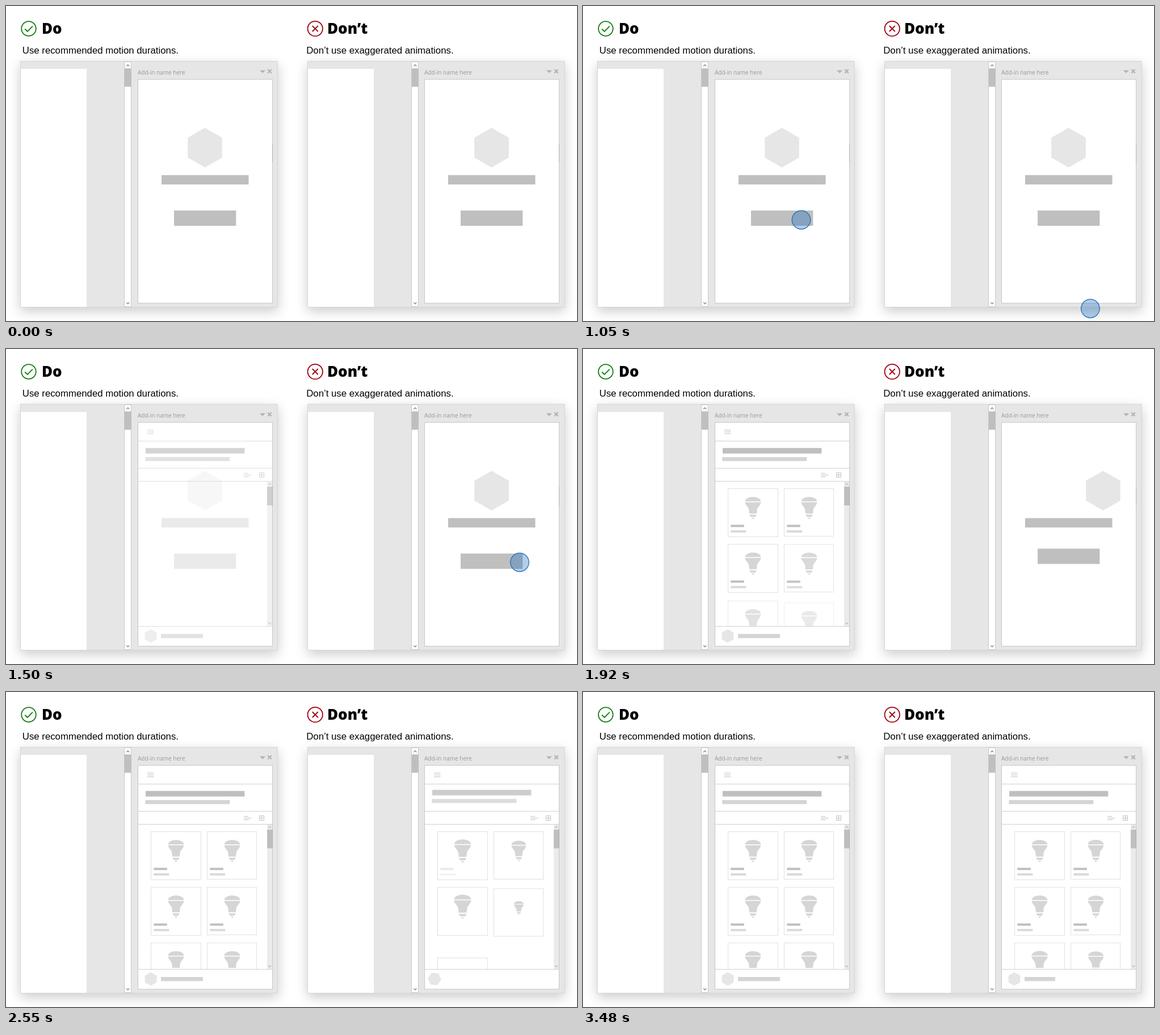
These frames come from a looping animation (1006x556 px, 4.47 s). An HTML page with a canvas:

```html
<!DOCTYPE html>
<html lang="en">
<head>
<meta charset="utf-8">
<title>Motion durations</title>
<style>
  html, body { margin: 0; width: 100%; height: 100%; overflow: hidden; background: #fff; }
  canvas { display: block; }
</style>
</head>
<body>
<canvas id="stage" width="1006" height="556"></canvas>
<script>
const ctx = document.getElementById('stage').getContext('2d');
const LOOP = 4470, STEP = 30;
const MID = '#bfbfbf', SOFT = '#d4d4d4', PALE = '#e6e6e6', LINE = '#d0d0d0';

// Progress of t through [a, b], held at 0 and 1 outside
const prog = (t, a, b) => Math.max(0, Math.min(1, (t - a) / (b - a)));
const inOut = p => p < .5 ? 2 * p * p : 1 - 2 * (1 - p) ** 2;

function rect(x, y, w, h, color) {
  ctx.fillStyle = color;
  ctx.fillRect(x, y, w, h);
}
function frame(x, y, w, h, color) {
  ctx.strokeStyle = color;
  ctx.lineWidth = 1;
  ctx.strokeRect(x, y, w, h);
}
function stroke(d, color, width) {
  ctx.strokeStyle = color;
  ctx.lineWidth = width;
  ctx.stroke(new Path2D(d));
}
function circle(x, y, r, color, width, fill) {
  ctx.beginPath();
  ctx.arc(x, y, r, 0, Math.PI * 2);
  if (fill) { ctx.fillStyle = fill; ctx.fill(); }
  ctx.strokeStyle = color;
  ctx.lineWidth = width;
  ctx.stroke();
}
function hexagon(x, y, r, turn = 0) {
  ctx.beginPath();
  for (let i = 0; i < 6; i++) {
    const a = turn + i * Math.PI / 3;
    ctx.lineTo(x + r * Math.sin(a), y - r * Math.cos(a));
  }
  ctx.fillStyle = PALE;
  ctx.fill();
}
function text(s, x, y, font, color) {
  ctx.font = font;
  ctx.fillStyle = color;
  ctx.fillText(s, x, y);
}
// Runs draw with its own transform, clip and opacity
function layer(dx, dy, alpha, draw) {
  if (alpha <= 0) return;
  ctx.save();
  ctx.translate(dx, dy);
  ctx.globalAlpha *= alpha;
  draw();
  ctx.restore();
}
function clip(x, y, w, h) {
  ctx.beginPath();
  ctx.rect(x, y, w, h);
  ctx.clip();
}
const chevron = (x, y, up, color) =>
  stroke(`M${x - 2.5},${y + up * 1.3}L${x},${y - up * 1.3}L${x + 2.5},${y + up * 1.3}`, color, 1.2);

const bulbShape = new Path2D(
  'M-14,-11.5C-13,-22 13,-22 14,-11.5Z' +
  'M-14,-10C-13,-3 -7,-2 -7,5L-6.5,10H6.5L7,5C7,-2 13,-3 14,-10Z' +
  'M-6,12H6Q5,16 3,16H-3Q-5,16 -6,12Z' +
  'M-2.5,17.5H2.5L1,19.5H-1Z');

function chrome() {
  ctx.save();
  ctx.shadowColor = 'rgba(0,0,0,.2)';
  ctx.shadowBlur = 20;
  ctx.shadowOffsetY = 7;
  rect(25, 97, 453.5, 435, PALE);
  ctx.restore();
  frame(25.5, 97.5, 452.5, 434, '#d6d6d6');
  rect(26, 111, 116, 420, '#fff');
  rect(209, 99, 12, 432, '#fff');
  frame(208.5, 98.5, 12, 432, '#c8c8c8');
  rect(209, 110, 12, 32.5, MID);
  stroke('M209,110.5H221', '#c8c8c8', 1);
  chevron(214.8, 105, 1, '#777');
  chevron(214.8, 524.5, -1, '#777');
}

function paneHead() {
  text('Add-in name here', 232, 121, '10px "Open Sans", "Noto Sans", sans-serif', '#999');
  ctx.fillStyle = '#b2b2b2';
  ctx.fill(new Path2D('M447,113.5H457L452,118.5Z'));
  stroke('M461.3,112L467.7,118.5M467.7,112L461.3,118.5', '#b2b2b2', 2.2);
  rect(232, 129, 238, 395, '#fff');
}

function splash(hexX, buttonY) {
  hexagon(350.5 + hexX, 250, 35);
  rect(274, 298.5, 153.5, 16.5, MID);
  rect(296, 361 + buttonY, 109.3, 27, MID);
}

function card(i, s) {
  const x = i % 2 ? 354.5 : 255.5, y = 246.5 + 98.2 * (i >> 1);
  layer(x, y + s.dy, s.alpha, () => {
    frame(0, 0, i % 2 ? 87 : 88, i % 2 ? 84 : 85, '#e0e0e0');
    layer(44, 34, s.bulb > 0 ? 1 : 0, () => {
      ctx.scale(s.bulb, s.bulb);
      ctx.fillStyle = '#d5d5d5';
      ctx.fill(bulbShape);
    });
    layer(4.8, 0, s.label, () => {
      rect(0, 63.8, 23.5, 4, MID);
      rect(0, 73.5, 27, 4, '#dadada');
    });
  });
}

// s: title {alpha, dy}, cards(i), footX, footW
function screen(s) {
  ctx.save();
  clip(232, 129, 238, 395);
  stroke('M249,143H260.5M249,146.3H260.5M249,149.6H260.5', MID, 1);
  layer(0, s.title.dy, s.title.alpha, () => {
    rect(246, 174.7, 174.3, 9.8, MID);
    rect(245.3, 190.8, 149, 7, SOFT);
  });
  stroke('M419,219.5H427M419,222.5H432.5M419,225.5H428', MID, 1.1);
  frame(446.5, 218.5, 8, 8, '#c4c4c4');
  stroke('M450.5,218V227M446,222.5H455', '#c4c4c4', 1);

  ctx.save();
  clip(233, 234, 227, 255);
  for (let i = 0; i < 6; i++) card(i, s.cards(i));
  ctx.restore();

  rect(460, 234, 9.5, 255, '#ebebeb');
  rect(460, 243, 9.5, 33, MID);
  chevron(464.7, 238.5, 1, '#b8b8b8');
  chevron(464.7, 484, -1, '#b8b8b8');
  stroke('M233,162.5H469M233,210.5H469M233,233.5H469M233,489.5H469', LINE, 1);
  hexagon(255 + s.footX, 506.5, 12, s.footX / 12);
  rect(273, 503, s.footW, 7.3, SOFT);
  ctx.restore();
}

function paneEdge() {
  frame(232.5, 129.5, 237, 395, '#c8c8c8');
  rect(469, 243, 1, 33, '#b0b0b0');
}

function cursor(x0, x1, y1, p, alpha) {
  const e = inOut(p);
  layer(x0 + (x1 - x0) * e, 574 + (y1 - 574) * e, alpha,
    () => circle(0, 0, 16.3, '#1a69b8', 1.2, 'rgba(0,95,184,.3)'));
}

// Calm: one cross-fade, then cards follow quickly
function calmPane(t) {
  const fade = prog(t, 1300, 1600);
  layer(0, 0, 1 - fade, () => splash(0, 0));
  layer(0, 0, fade, () => screen({
    title: { alpha: 1, dy: 0 },
    cards: i => {
      const p = prog(t, 1620 + 40 * i, 1820 + 40 * i);
      return { alpha: p, dy: 20 * (1 - p) ** 2, bulb: 1, label: 1 };
    },
    footX: 0, footW: 74
  }));
}

// Grows past full size, then rings out
function bounce(t) {
  if (t < 0) return Math.max(0, 1.15 * (1 + t / 225));
  return 1 + .15 * Math.exp(-t / 330) * Math.cos(t * Math.PI / 180);
}

// Busy: everything swings, rolls and bounces
function busyPane(t) {
  const swing = t < 1742 ? 0 : Math.sin((t - 1742) / 350 * Math.PI / 2);
  const title = prog(t, 2340, 2610);
  layer(0, 0, 1 - prog(t, 2175, 2325), () => {
    clip(232, 129, 238, 395);
    splash(85 * swing, -12 * swing);
  });
  layer(0, 0, prog(t, 2155, 2395), () => screen({
    title: { alpha: title, dy: -9 * (1 - title) },
    cards: i => ({
      alpha: 1,
      dy: 13 * Math.max(0, (2190 + 140 * i - t) / 140) ** 2,
      bulb: bounce(t - 2190 - 155 * i),
      label: prog(t, 2520 + 160 * i, 2610 + 160 * i)
    }),
    footX: -30 * (1 - prog(t, 2300, 2600)),
    footW: 54 * (1 - (1 - prog(t, 2600, 3480)) ** 1.4)
  }));
}

function draw(t) {
  rect(0, 0, 1006, 556, '#fff');

  const head = '800 26px "Open Sans", "Noto Sans", sans-serif';
  const body = '16.8px "Liberation Sans", Arial, sans-serif';
  circle(40, 40, 12.8, '#107c10', 1.8);
  stroke('M33.3,40.5L37.8,45L47,35.7', '#107c10', 1.8);
  text('Do', 63, 49.3, head, '#000');
  text('Use recommended motion durations.', 28.8, 83.5, body, '#000');
  circle(544.7, 40, 13.2, '#a00010', 1.8);
  stroke('M539.7,35L549.7,45M549.7,35L539.7,45', '#a00010', 1.8);
  text('Don’t', 566, 49.3, head, '#000');
  text('Don’t use exaggerated animations.', 529.2, 83.5, body, '#000');

  layer(0, 0, 1, chrome);
  layer(506, 0, 1, chrome);
  [[0, calmPane], [505, busyPane]].forEach(([dx, pane]) => layer(dx, 0, 1, () => {
    paneHead();
    pane(t);
    paneEdge();
  }));

  cursor(372, 384.5, 377.5, prog(t, 600, 1050), 1 - prog(t, 1140, 1260));
  cursor(891, 905, 376.5, prog(t, 840, 1500), 1 - prog(t, 1600, 1740));
}

const start = performance.now();
function tick() {
  const t = (performance.now() - start) % LOOP;
  draw(t - t % STEP);
  requestAnimationFrame(tick);
}
tick();
</script>
</body>
</html>
```
